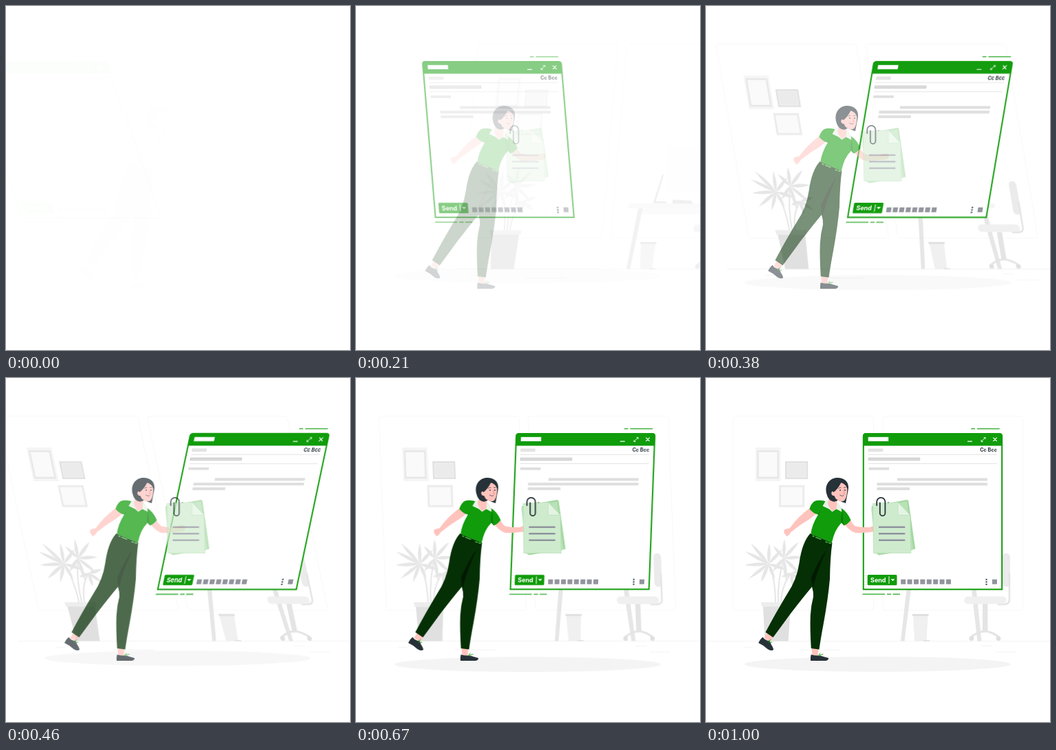
Recreate the animation shown at these times as an HTML page. Size 500 by 500 pixels, loop 1040 ms.

```html
<!DOCTYPE html>
<html lang="en">
<head>
<meta charset="utf-8">
<title>Sending an email</title>
<style>
  html, body { margin: 0; width: 100%; height: 100%; overflow: hidden; background: #fff; }
  svg { display: block; width: 100vw; height: 100vh; }
  #room { transform-origin: 250px 227px; }
  #mail { transform-origin: 250px 193px; }
  text { font-family: Inter, "Open Sans", sans-serif; }
  .green { fill: #109c0b; }
  .skin { fill: #ffc3bd; }
  .dark { fill: #263238; }
  .pants { fill: #052f04; }
  .line { fill: none; stroke-linecap: round; stroke-linejoin: round; }
</style>
</head>
<body>
<svg viewBox="0 0 500 500">
  <ellipse id="shadow" cx="249.5" cy="416" rx="193.5" ry="11" fill="#f4f4f4"/>

  <g id="room">
    <g fill="none" stroke="#f3f3f3" stroke-width=".6">
      <rect x="40" y="55.5" width="203.5" height="282" rx="4"/>
      <rect x="257" y="55.5" width="203.5" height="282" rx="4"/>
      <path stroke="#ebebeb" d="M0 382.4H500M55 391.3H68M137 395.4H196M400 389.5H416M421 398.3H450"/>
    </g>

    <!-- pictures -->
    <path fill="#f5f5f5" d="M72 101h36.5v49H72z"/>
    <path fill="#e6e6e6" d="M74.3 105.2h31.4v41H74.3z"/>
    <path fill="#fafafa" d="M76.5 107.6h27v36.2h-27z"/>
    <path fill="#e2e2e2" d="M115 121h33.2v26H115z"/>
    <path fill="#ebebeb" stroke="#f5f5f5" stroke-width=".7" d="M118 124h27.2v20H118z"/>
    <path fill="#ececec" d="M106 155.7h37.2v32H106z"/>
    <path fill="#fafafa" d="M109 158.7h31.2v26H109z"/>

    <!-- plant -->
    <g id="leaves" fill="#e6e6e6"></g>
    <path class="line" stroke="#e6e6e6" stroke-width="2" d="M91 270Q101 292 101 327M113 262Q104 292 105 327M124 284Q110 300 109 327"/>
    <path fill="#e0e0e0" d="M83 332H123L119.5 382.4H85.5Z"/>
    <path fill="#ededed" d="M80 325.8H126L125 332.5H81Z"/>

    <!-- desk -->
    <path fill="#f5f5f5" d="M279 287H405V294H279Z"/>
    <path fill="#f8f8f8" d="M298 294H390V303H298Z"/>
    <path fill="#e6e6e6" d="M293 294H299.5L288.500 382.4H283ZM384.5 294H391.5L400.5 382.4H394.5Z"/>
    <path fill="#fdfdfd" d="M328 203H402V272H330Z"/>
    <path fill="#e0e0e0" d="M314 286.8L324 245H326L317.5 284H333V286.8ZM342 281.5L369 283 372 287H342Z"/>

    <!-- bin -->
    <path fill="#f0f0f0" d="M301 345H322.5L320.5 382.4H303Z"/>
    <path fill="#e0e0e0" d="M300 343H323.5V346H300Z"/>
    <path stroke="#e0e0e0" stroke-width="1.5" d="M316 381.8H325"/>

    <!-- chair -->
    <rect x="431" y="254.5" width="11" height="49" rx="5.5" fill="#ebebeb"/>
    <path class="line" stroke="#e4e4e4" stroke-width="2.5" d="M441 285V322Q441 328.5 434 329H425"/>
    <rect x="375.5" y="317.5" width="61" height="11" rx="5" fill="#f0f0f0"/>
    <path fill="#e4e4e4" d="M402 328.5H409.5V368H402Z"/>
    <path class="line" stroke="#e4e4e4" stroke-width="3" d="M386 376Q395 369 405.5 368Q416 369 425 376"/>
    <g fill="#e0e0e0"><circle cx="386" cy="378.6" r="3.4"/><circle cx="425" cy="378.6" r="3.4"/></g>
  </g>

  <g id="mail">
    <path stroke="#47b443" stroke-width="1.6" d="M385.3 73.7H391M394 73.7H426.7M227.5 314.3H260M263 314.3H269.3M271.5 314.3H282"/>
    <path fill="#fff" stroke="#109c0b" stroke-width="2" d="M228.8 307.2V85Q228.8 81 233 81H426Q430.2 81 430.2 85V307.2Z"/>
    <path class="green" d="M228 98.4V84.5Q228 80 233 80H426Q431 80 431 84.5V98.4Z"/>
    <path fill="#fff" d="M235.7 85.8H265.2V91.9H235.7Z"/>
    <path class="line" stroke="#fff" stroke-width="1.2" d="M380.5 92.2H386.5M417.7 86.8L422.5 91.6M422.5 86.8L417.7 91.6"/>
    <path class="line" stroke="#fff" stroke-width=".9" d="M400.5 92.2L405.700 86.800M404 86.500H406V88.500M400.200 90.500V92.500H402.200"/>
    <text x="398.2" y="107" font-size="7.3" font-weight="700" class="dark">Cc Bcc</text>
    <path stroke="#dcdcdc" stroke-width=".8" d="M236 111.3H423M236 124.5H423"/>
    <path fill="#e4e4e4" stroke="#d2d2d2" stroke-width=".5" d="M236.2 103H256.8V106.8H236.2Z"/>
    <path fill="#dcdcdc" stroke="#a9a9a9" stroke-width=".5" d="M236.2 116.1H310.8V119.6H236.2Z"/>
    <path fill="#dedede" d="M236.4 130H266V133.7H236.4ZM278 145.4H409V149.4H278ZM248.5 152.2H409V156.2H248.5ZM248.5 159H296V163H248.5Z"/>
    <rect class="green" x="234.7" y="286" width="42.8" height="15.2" rx="1.5"/>
    <text x="239" y="296.8" font-size="9" font-weight="700" fill="#fff">Send</text>
    <path stroke="#fff" d="M266 288.3V299"/>
    <path fill="#fff" d="M268.6 292.2H274.4L271.5 295.2Z"/>
    <g id="tools" fill="#91949d"><path d="M416 292.7H423V299.7H416Z"/></g>
    <g fill="#455a64"><circle cx="407.6" cy="292.9" r="1.2"/><circle cx="407.6" cy="296.4" r="1.2"/><circle cx="407.6" cy="299.9" r="1.2"/></g>
  </g>

  <g id="woman">
    <!-- far arm and hand -->
    <path class="skin" d="M200 211L209 204.5Q213 213 217.5 215.5Q228 217.5 238 217L246 214Q252 214.5 252 219Q251 223.5 243 223.5Q228 226 217 225Q208 222 200 211Z"/>
    <!-- near arm -->
    <path class="skin" d="M152 188L162 196Q152 205 139.5 212Q130 219 123.5 224Q120 230 116 230Q117 227 114.5 227Q112.5 223 114 220.5Q118 218.5 121.5 218.5Q133 202 152 188Z"/>
    <!-- feet -->
    <path class="skin" d="M89.5 369.5L98 375.5 93 383 84.5 378ZM153.5 391.5H163.5L162.5 404H154.5Z"/>
    <path class="dark" d="M82.5 376.5Q78 380 76.2 385Q83 388 89.5 394Q94 397 98 395.3Q98.5 393 94.5 387Q93 381 90 382Q85 380.5 82.5 376.5ZM152.7 402Q151.5 406 152 411H174Q178.5 410 178 407Q173 405.5 166 403.5Q159 404 152.7 402Z"/>
    <path class="line" stroke="#109c0b" stroke-width=".9" d="M90 383L94 380.5M91.5 384.5L95.8 384M163.5 403.5L166 400M165 403L170 401.5"/>
    <!-- trousers -->
    <path class="pants" d="M151.5 226L183.5 239.5Q180.5 260 180 292Q177.5 320 171 356Q167 377 164.5 394.5L152.8 393Q151 365 151.8 345Q152.5 331 156 318Q156.500 311 154 303.500Q141 319 122.500 343Q108 363 97.500 377L86.5 369.5Q101 342 118.500 313Q132 293 135.500 269Q139.5 239 151.5 226Z"/>
    <path fill="#021a02" d="M175 250Q164.500 264 153 290Q153 297 156 305Q158 289 175 250Z"/>
    <path class="line" stroke="#47b443" stroke-width="1.4" d="M155 229.5L157 230.5M159.5 231.5L167 234.5M174 238L176.5 239M178.5 239.5L181.5 240.5"/>
    <!-- shirt -->
    <path class="green" d="M171.5 178.5Q161 176.5 157 179.5Q152 184 150.5 190.5Q156 197 163 198.5Q154 213 152.3 226.600L182.8 239.500Q187 220 197 210.5L200.5 214.5Q206 212.5 210.5 206.5Q205 194 197 189.5Z"/>
    <path fill="#000" fill-opacity=".2" d="M198.5 193Q195 203 197 210.5L200.5 214.5Q198.5 206 198.5 193ZM163 198.5L167 191 164 199Z"/>
    <!-- neck and collar -->
    <path fill="#e7f4e6" d="M174.5 177.5L169.5 186 179 190.5 183.5 194.5 189.5 190.5 197 194.5Q198 187 190.5 180Z"/>
    <path class="skin" d="M179 174H191L189.5 190 183.8 193.8Q178 188 177 182Z"/>
    <!-- head -->
    <path class="dark" d="M175.5 169C171.5 155 180 145 191 145C202 145 208.5 152 206.8 162L203 182Q197 180 192 177.5Q187 181.5 181 178Q177 175 175.5 169Z"/>
    <path class="skin" d="M185.500 166Q189 157 195.500 152Q203 152.500 205.300 161Q205.200 172 202 177Q199.500 180.500 193.500 178.500Q188 176.500 186.800 171.500Q182.200 171 182.200 167Q183.500 163 185.500 166Z"/>
    <path class="dark" d="M185 166Q187 155 197 150.500Q194 158 187.500 164.500ZM196 151.500L204 151 206.800 160Q203 154.500 196 151.500Z"/>
    <path class="line" stroke="#263238" stroke-width=".7" d="M192.5 160.5Q194 158.7 196 159.3M200.5 159.5L203 159"/>
    <circle class="dark" cx="195" cy="163" r=".9"/><circle class="dark" cx="202" cy="163" r=".9"/>
    <path class="line" stroke="#ed847e" stroke-width=".8" d="M199.5 163.5L201.5 168.3H199.5"/>
    <path class="line" stroke="#263238" stroke-width=".7" d="M194.5 170Q197 172.8 200 171"/>
  </g>

  <g id="papers">
    <path fill="#a5d9a3" d="M240.5 186.5L292 177Q294 177 294.5 180L304.3 248.5 251 257.5Q249.5 257 249 255Z"/>
    <path fill="#b9e2b7" d="M240.2 190L292 179.5 301 250 247.5 256Z"/>
    <path fill="#cfebce" stroke="#a5d9a3" stroke-width=".5" d="M242.5 182.5L279 180.5 296.8 199.5 298 254.5H243.5Z"/>
    <path fill="#e4f4e3" stroke="#a5d9a3" stroke-width=".5" d="M279 180.5V199.3H296.8Z"/>
    <path stroke="#8f949d" stroke-width="2.5" d="M251 216.7H289.3M251 226.2H289.3M251 235.7H289.3"/>
    <path class="line" stroke="#263238" stroke-width="1.8" d="M248.2 185V180A6.1 6.1 0 0 1 260.4 180V196.5A3.8 3.8 0 0 1 252.8 196.5V181.5"/>
    <circle class="dark" cx="265" cy="181" r=".7"/>
  </g>
</svg>

<script>
  const $ = id => document.getElementById(id);
  const LOOP = 1040, STEP = 1000 / 24;
  const easing = "cubic-bezier(.36,-.01,.5,1.38)";

  function addPath(parent, d) {
    const path = document.createElementNS("http://www.w3.org/2000/svg", "path");
    path.setAttribute("d", d);
    parent.append(path);
  }

  // A pointed leaf from the heart of the plant to its tip
  function leaf(x, y, tipX, tipY, w = 5) {
    const dx = tipX - x, dy = tipY - y, len = Math.hypot(dx, dy);
    const nx = -dy / len * w, ny = dx / len * w;
    const mx = x + dx * .4, my = y + dy * .4;
    addPath($("leaves"), `M${x} ${y}Q${mx + nx} ${my + ny} ${tipX} ${tipY}Q${mx - nx} ${my - ny} ${x} ${y}`);
  }

  const plants = [
    [91, 270, [[65, 240], [57, 252], [56, 272], [62, 292], [80, 297], [92, 240], [111, 249], [118, 279], [100, 293]]],
    [113, 262, [[98, 244], [114, 234], [135, 238], [142, 260], [136, 284], [117, 296], [97, 281]]],
    [124, 284, [[144, 278], [141, 297], [126, 303], [110, 289]]]
  ];
  for (const [x, y, tips] of plants)
    for (const [tx, ty] of tips) leaf(x, y, tx, ty);

  for (let i = 0; i < 8; i++) addPath($("tools"), `M${283.2 + i * 9.4} 292.7h7v7h-7z`);

  function animate(id, frames) {
    const anim = $(id).animate(frames.map(f => ({ easing, ...f })), { duration: 1000, fill: "both" });
    anim.pause();
    return anim;
  }

  // Rush in from one side, leaning, then settle
  function rush(id, side) {
    const pose = (x, lean) => `translateX(${x * side}px) skewX(${-lean * side}deg)`;
    return animate(id, [
      { offset: 0, opacity: 0, transform: pose(250, 20) },
      { offset: .6, opacity: 1, transform: pose(0, -10) },
      { offset: .8, opacity: 1, transform: pose(0, 2) },
      { offset: 1, opacity: 1, transform: pose(0, 0) }
    ]);
  }

  const slide = (id, x, y = 0) => animate(id, [
    { opacity: 0, transform: `translate(${x}px, ${y}px)` },
    { opacity: 1, transform: "translate(0px, 0px)" }
  ]);

  const anims = [rush("room", 1), rush("mail", -1), slide("woman", 30), slide("papers", -30), slide("shadow", 0, -30)];

  // The picture moves in 24 steps per second, on a 10 ms grid
  function clock(t) {
    const k = Math.floor((Math.floor(t / 10) * 10 + 4) / STEP);
    return k < 2 ? 46 : Math.min(1000, k * STEP + 24);
  }

  let start;
  function draw(now) {
    start ??= now;
    const time = clock((now - start) % LOOP);
    for (const anim of anims) anim.currentTime = time;
    requestAnimationFrame(draw);
  }
  for (const anim of anims) anim.currentTime = clock(0);
  requestAnimationFrame(draw);
</script>
</body>
</html>
```
